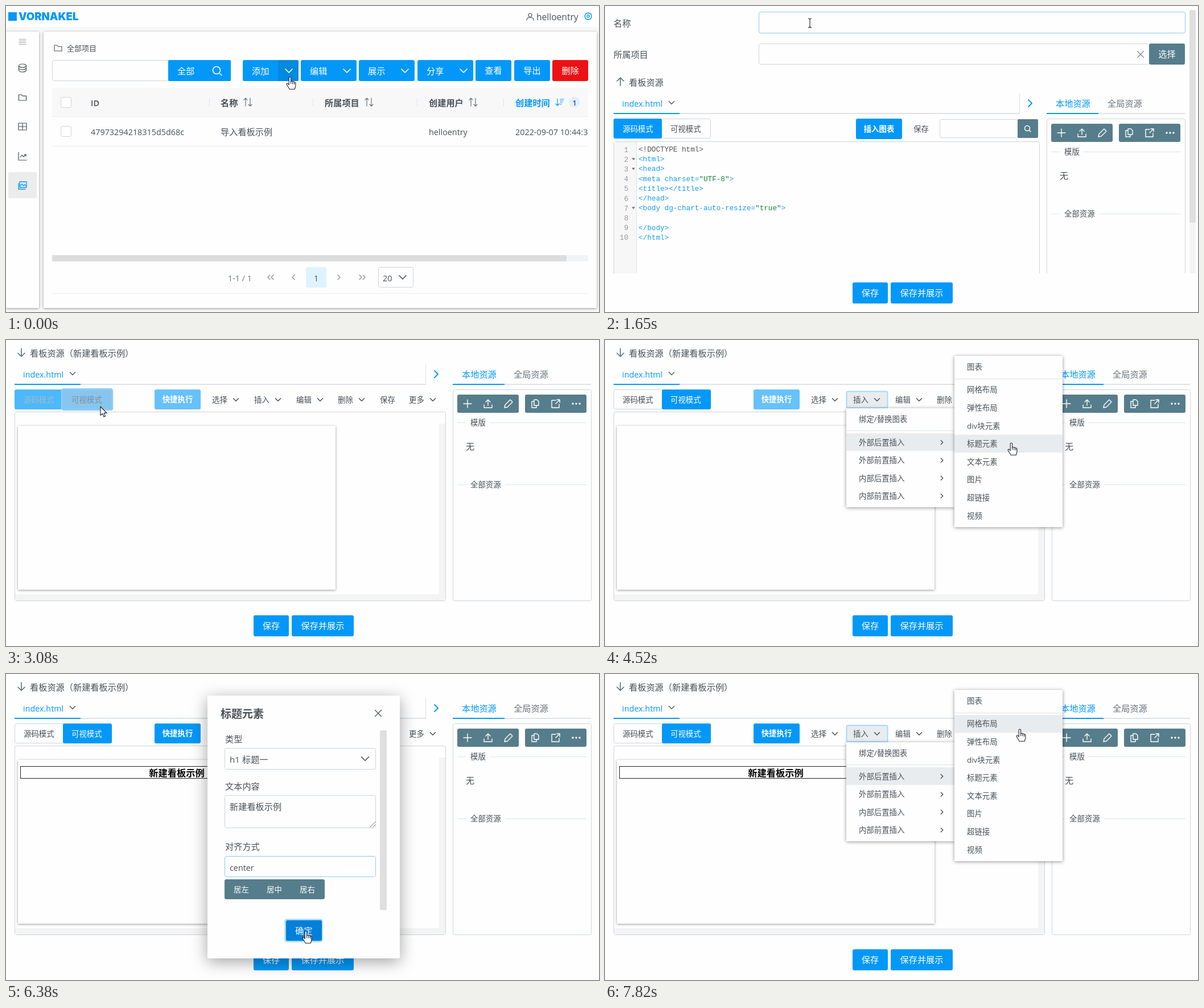
An HTML page for the animation above (8000 ms loop, 1042 px wide and 538 px high).

```html
<!DOCTYPE html>
<html lang="zh-CN">
<head>
<meta charset="utf-8">
<title>看板编辑演示</title>
<style>
html, body { margin: 0; width: 100%; height: 100%; overflow: hidden; background: #fefefe; }
svg { display: block; width: 1042px; height: 538px; }
text { font-family: "Open Sans", "Noto Sans CJK SC", "Noto Sans CJK", sans-serif; white-space: pre; }
.code { font-family: "Liberation Mono", monospace; }
.logo { font-family: Inter, sans-serif; }
.lift { filter: drop-shadow(0 1px 3px rgba(0,0,0,.42)); }
.page { filter: drop-shadow(0 1px 2px rgba(0,0,0,.4)); }
.dialog { filter: drop-shadow(0 6px 14px rgba(0,0,0,.36)); }
</style>
</head>
<body>
<svg id="stage" viewBox="0 0 1042 538"></svg>
<script>
const BLUE = '#0398f7', SLATE = '#567d8b', INK = '#495057', EDGE = '#ced4da', RULE = '#dee2e6',
      HOVER = '#e9ecef', RING = '#a6d9fc', WHITE = '#fefefe';

// Drawing helpers
const rect = (x, y, w, h, fill, r = 0) =>
  `<rect x="${x}" y="${y}" width="${w}" height="${h}" rx="${r}" fill="${fill}"/>`;
const box = (x, y, w, h, stroke = EDGE, fill = WHITE, r = 3) =>
  `<rect x="${x + .5}" y="${y + .5}" width="${w - 1}" height="${h - 1}" rx="${r}" fill="${fill}" stroke="${stroke}"/>`;
const hline = (x1, x2, y, c = RULE, h = 1) => rect(x1, y, x2 - x1, h, c);
const text = (x, cy, s, { size = 15.2, fill = INK, bold = 400, anchor = 'start', cls = '' } = {}) => {
  const latin = /^[\x00-\x7f]*$/.test(s) && !cls;
  return `<text x="${x}" y="${cy + size * .37}" font-size="${latin ? size * .945 : size}" fill="${fill}"
    font-weight="${bold}" text-anchor="${anchor}" class="${cls}">${s.replace(/</g, '&lt;')}</text>`;
};
const small = (x, y, s, fill = INK, bold = 400) => text(x, y, s, { size: 13.4, fill, bold });
const icon = (x, y, d, c = INK, w = 1.3) =>
  `<path transform="translate(${x} ${y})" d="${d}" fill="none" stroke="${c}" stroke-width="${w}" stroke-linecap="round" stroke-linejoin="round"/>`;
const down = (x, y, c = INK, s = 4.5, w = 1.7) => icon(x, y, `M${-s} ${-s / 2}L0 ${s / 2}L${s} ${-s / 2}`, c, w);
const right = (x, y, c = INK, s = 4, w = 1.4) => icon(x, y, `M${-s / 2} ${-s}L${s / 2} 0L${-s / 2} ${s}`, c, w);
const left = (x, y, c) => icon(x, y, 'M2-4L-2 0L2 4', c, 1.4);
const button = (x, y, w, h, s, fill = BLUE, size = 15.2, bold = 400) =>
  rect(x, y, w, h, fill, 3) + text(x + w / 2, y + h / 2, s, { size, bold, fill: '#fff', anchor: 'middle' });

const P = {
  search: 'M5.5 5.5L9 9M6.5 0A6.5 6.5 0 1 1-6.5 0A6.5 6.5 0 0 1 6.5 0',
  folder: 'M-6.5 5V-5H-2L0-2.8H6.5V5Z',
  cross: 'M-5.5-5.5L5.5 5.5M5.5-5.5L-5.5 5.5',
  plus: 'M-7 0H7M0-7V7',
  upload: 'M-7 2V7H7V2M0 3V-7M-4-3L0-7L4-3',
  pen: 'M-7 7L-6 2L3-7L7-3L-2 6Z',
  copy: 'M-2-7H3L6-4V3H-2ZM-2-4H-6V7H2V3',
  open: 'M0-6H-7V7H6V1M2-7H7V-2M7-7L0 0',
  user: 'M3-3A3 3 0 1 1-3-3A3 3 0 0 1 3-3M-6 6Q-6 1.5-2 1.5H2Q6 1.5 6 6',
  bars: 'M-6-4.5H6M-6-1.5H6M-6 1.5H6M-6 4.5H6',
  db: 'M-6.5-4A6.5 3 0 1 1 6.5-4A6.5 3 0 1 1-6.5-4V4A6.5 3 0 0 0 6.5 4V-4M-6.5 0A6.5 3 0 0 0 6.5 0',
  grid: 'M-7-6H7V6H-7ZM-7 0H7M0-6V6',
  chart: 'M-7-7V7H7M-4 2L-1-2L2 1L6-3M3-3H6V0',
  images: 'M-5-6H7V4H-5ZM-7-3V7H5M-5 2L-1-2L2 1L4-1L7 2',
  sort: 'M-4 7V-7M-7-4L-4-7L-1-4M4-7V7M1 4L4 7L7 4',
  sortDown: 'M-4-6V6M-7 3L-4 6L-1 3M1-5H7M1-2H6M1 1H4M1 4H3'
};

function addMenu(hover) {
  const rows = ['新建', '复制', '导入', '导入模板'];
  return `<g class="lift">${rect(412, 134, 196, 163, '#fff', 2)}</g>` +
    (hover ? rect(412, 138, 196, 39, HOVER) : '') +
    rows.map((s, i) => text(432, 157 + 39 * i, s)).join('');
}

function list(on) {
  const dropdowns = [[416, '添加'], [518, '编辑'], [620, '展示'], [723, '分享']];
  const plain = [[825, '查看'], [893, '导出'], [960, '删除']];
  const columns = [[377, '名称', 425], [560, '所属项目', 638], [743, '创建用户', 821]];
  const panel = (x, w) => `<g class="page">${rect(x, 45, w, 486, WHITE, 2)}</g>`;
  const side = [['bars', 63, '#a0a4a8'], ['db', 109], ['folder', 161], ['grid', 212], ['chart', 264]];
  return rect(0, 0, 1042, 538, '#f8f8f8') + rect(0, 0, 1042, 37, WHITE) +
    rect(4, 11, 15, 15, BLUE) +
    text(22, 18.5, 'VORNAKEL', { size: 18.5, fill: BLUE, bold: 900, cls: 'logo' }) +
    icon(921, 19, P.user, INK, 1.1) + text(932, 19, 'helloentry', { size: 16.5 }) +
    icon(1023, 18, 'M6 0L4.5 4.5L0 6L-4.5 4.5L-6 0L-4.5-4.5L0-6L4.5-4.5ZM2 0A2 2 0 1 1-2 0A2 2 0 0 1 2 0', BLUE, 1.4) +
    panel(0, 58) + panel(66, 972) + rect(4, 292, 50, 46, '#ececec', 3) +
    side.map(([k, y, c]) => icon(29, y, P[k], c, 1.2)).join('') + icon(29, 315, P.images, BLUE) +
    icon(91.5, 74, P.folder, INK, 1.1) + text(107, 74, '全部项目', { size: 13 }) +
    box(81, 95, 205, 37) + rect(285, 95, 110, 37, BLUE, 2) + text(301, 114, '全部', { fill: '#fff' }) +
    icon(370, 113, P.search, '#fff', 1.5) +
    dropdowns.map(([x, s], i) => rect(x, 95, 98, 37, BLUE, 3) +
      (i ? '' : rect(478, 95, 36, 37, '#0489e0', 3)) +
      text(x + 16, 114, s, { fill: '#fff' }) + down(x + 81, 114, '#fff', 6)).join('') +
    plain.map(([x, s], i) => button(x, 95, 63, 37, s, i > 1 ? '#ec1114' : BLUE)).join('') +
    rect(81, 144, 942, 50, '#f8f8f9') + hline(81, 1023, 194, HOVER) + hline(81, 1023, 246, HOVER) +
    box(96, 160, 19, 19) + box(96, 211, 19, 19) +
    [357, 539, 722, 874].map(x => rect(x, 163, 1, 14, RULE)).join('') +
    text(149, 170, 'ID', { bold: 600 }) +
    columns.map(([x, s, ix]) => text(x, 170, s, { bold: 600 }) + icon(ix, 169, P.sort, '#6c757d', 1.2)).join('') +
    text(895, 170, '创建时间', { bold: 600, fill: BLUE }) + icon(973, 169, P.sortDown, BLUE, 1.2) +
    `<circle cx="999" cy="169" r="9.5" fill="#dff1fd"/>` +
    text(999, 169.5, '1', { size: 14, bold: 600, anchor: 'middle' }) +
    text(149, 221, '47973294218315d5d68c') + text(377, 221, '导入看板示例') +
    text(743, 221, 'helloentry') + text(895, 221, '2022-09-07 10:44:32') + rect(1023, 196, 14, 49, WHITE) +
    rect(81, 438, 942, 11, '#f1f3f5') + rect(81, 438, 904, 11, '#dcdcdc', 2) +
    text(390, 478, '1-1 / 1', { fill: '#6c757d' }) +
    left(462, 477, '#8b9299') + left(468, 477, '#8b9299') + left(505, 477, '#8b9299') +
    rect(527, 459, 36, 36, '#dff3fd', 3) + text(545, 478, '1', { anchor: 'middle' }) +
    right(585, 477, '#8b9299') + right(623, 477, '#8b9299') + right(629, 477, '#8b9299') +
    box(654, 459, 62, 36) + text(662, 478, '20') + down(697, 477, INK, 6) +
    hline(81, 1023, 505, HOVER) + (on.add ? addMenu(on.hover) : '');
}

function source(x, y, bottom) {
  const lines = ['<!DOCTYPE html>', '<html>', '<head>', '<meta charset="UTF-8">', '<title></title>', '</head>',
    '<body dg-chart-auto-resize="true">', '', '</body>', '</html>'];
  const paint = (s, i) => i ? s.split(/("[^"]*")/).map((p, k) =>
    `<tspan fill="${k % 2 ? '#16873f' : '#1a9de9'}">${p.replace(/</g, '&lt;')}</tspan>`).join('') : s.replace(/</g, '&lt;');
  return button(x + 441, y + 198, 81, 36, '插入图表', BLUE, 13.4, 600) + small(x + 542, y + 216, '保存') +
    box(x + 588, y + 199, 138, 33) + rect(x + 725, y + 199, 36, 33, SLATE, 2) +
    icon(x + 742, y + 215, 'M3.5 3.5L6 6M4.5 0A4.5 4.5 0 1 1-4.5 0A4.5 4.5 0 0 1 4.5 0', '#fff', 1.5) +
    box(15, y + 238, 749 + x, bottom - y - 238) + rect(16, y + 239, 39, bottom - y - 240, '#f7f7f7') +
    rect(55, y + 239, 1, bottom - y - 240, RULE) +
    lines.map((s, i) => {
      const cy = y + 252 + 17.2 * i;
      return text(41, cy, String(i + 1), { size: 12.67, fill: '#999', anchor: 'end', cls: 'code' }) +
        `<text class="code" x="59" y="${cy + 4}" font-size="12.67" fill="#555">${paint(s, i)}</text>` +
        ([1, 2, 6].includes(i) ? `<path d="M47 ${cy - 2}h6l-3 4z" fill="#777"/>` : '');
    }).join('');
}

function visual(on) {
  const tools = [[362, '选择'], [436, '插入'], [510, '编辑'], [583, '删除'], [708, '更多']];
  return button(261, 87, 81, 35, '快捷执行', on.quick ? BLUE : '#67c1fa', 13.4, 600) +
    (on.insert ? `<rect x="424.5" y="90.5" width="72" height="29" rx="2" fill="${HOVER}" stroke="${RING}" stroke-width="2"/>` : '') +
    tools.map(([x, s]) => small(x, 105, s) + down(x + 42, 105, INK, 4.5, 1.5)).join('') + small(657, 105, '保存') +
    box(15, 126, 758, 333) + rect(761, 147, 11, 311, '#f4f4f4') + rect(16, 447, 756, 11, '#f4f4f4') +
    `<g class="page">${rect(21, 151, 558, 288, WHITE)}</g>` +
    (on.title ? box(25, 162, 550, 22, '#222', WHITE, 0) +
      text(300, 173.5, '新建看板示例', { size: 16.3, bold: 700, fill: '#000', anchor: 'middle' }) : '');
}

function modes(y, on) {
  if (on.fading) return rect(15, y, 84, 35, '#4cb9fb', 3) + small(31, y + 18, '源码模式', '#a3bac9') +
    `<rect x="98" y="${y - 1}" width="89" height="37" rx="3" fill="#88c5ee" stroke="#8dd0fc" stroke-width="2.5"/>` +
    small(115, y + 18, '可视模式', '#7f8f9b');
  const v = on.visual;
  return box(15, y, 171, 35) + rect(v ? 100 : 15, y, v ? 86 : 85, 35, BLUE, 3) +
    (on.ring ? `<rect x="99" y="${y - 1}" width="88" height="37" rx="4" fill="none" stroke="${RING}" stroke-width="2"/>` : '') +
    small(31, y + 18, '源码模式', v ? INK : '#fff') + small(115, y + 18, '可视模式', v ? '#fff' : INK);
}

function resources(x, y, bottom) {
  const slate = (bx, w, keys) => rect(bx, y + 207, w, 32, SLATE, 3) +
    keys.map((k, i) => icon(bx + 18 + 36 * i, y + 223, P[k], '#fff', 1.4)).join('');
  const legend = (cy, s, end) => hline(x + 784, x + 799, cy) + hline(x + end, x + 1011, cy) + small(x + 807, cy + .5, s);
  return text(x + 792, y + 171, '本地资源', { fill: BLUE }) + text(x + 883, y + 171, '全局资源', { fill: '#6c757d' }) +
    hline(x + 776, x + 867, y + 188, BLUE, 2) + hline(x + 867, x + 1019, y + 188, RULE, 2) +
    box(x + 776, y + 198, 244, bottom - y - 198) + slate(x + 784, 108, ['plus', 'upload', 'pen']) +
    slate(x + 903, 108, ['copy', 'open']) +
    [-6, 0, 6].map(d => `<circle cx="${x + 993 + d}" cy="${y + 223}" r="1.7" fill="#fff"/>`).join('') +
    legend(y + 256, '模版', 841) + text(x + 799, y + 298, '无') + legend(y + 365, '全部资源', 868);
}

function editor(on) {
  const wide = on.wide, x = wide ? 9 : 0, y = wide ? -111 : 0, bottom = wide ? 459 : 490;
  let out = rect(0, 0, 1042, 538, WHITE);
  if (!wide) out += text(15, 30, '名称') + box(270, 10, 750, 38, on.focus ? '#8cc9f5' : EDGE) +
    (on.name ? text(278, 30, '新建看板示例') : '') +
    text(15, 85, '所属项目') + box(270, 66, 688, 37) + icon(941, 85, P.cross, '#7b838a', 1.1) +
    button(956, 66, 63, 37, '选择', SLATE);
  out += icon(27, wide ? 22 : 133, wide ? 'M0-7V7M-6 1L0 7L6 1' : 'M0 7V-7M-6-1L0-7L6-1', '#56707c', 1.6) +
    text(42, y + 134, wide ? '看板资源（新建看板示例）' : '看板资源') +
    text(30, y + 171, 'index.html', { fill: BLUE }) + down(117, y + 170, '#666', 4.5) +
    hline(15, 131, y + 188, BLUE, 2) + hline(131, x + 728, y + 188, RULE, 2) +
    rect(x + 728, y + 153, 1, 37, RULE) + right(x + 747, y + 171, BLUE, 6, 1.9) +
    modes(y + 198, on) + (on.visual || on.fading ? visual(on) : source(x, y, bottom)) + resources(x, y, bottom);
  if (!wide) out += rect(0, 470, 1042, 68, WHITE) + rect(1027, 7, 11, 463, '#f4f4f4') + rect(1027, 7, 11, 374, '#dfdfdf', 2);
  const by = wide ? 484 : 486;
  return out + button(435, by, 62, 37, '保存') + button(502, by, 109, 37, '保存并展示') +
    (on.menu ? insertMenu(on) : '') + (on.dialog ? dialog(on) : '');
}

function insertMenu(on) {
  const rows = ['外部后置插入', '外部前置插入', '内部后置插入', '内部前置插入'];
  const kinds = ['网格布局', '弹性布局', 'div块元素', '标题元素', '文本元素', '图片', '超链接', '视频'];
  let out = `<g class="lift">${rect(424, 120, 190, 174, WHITE)}</g>` + small(446, 139, '绑定/替换图表') +
    hline(424, 613, 159) + (on.sub || on.first ? rect(424, 164, 190, 31, HOVER) : '') +
    rows.map((s, i) => small(446, 180 + 31.4 * i, s) + right(592, 180 + 31.4 * i, INK, 3.5)).join('');
  if (on.sub) out += `<g class="lift">${rect(614, 28, 190, 301, WHITE)}</g>` +
    (on.pick >= 0 ? rect(614, 72 + 31.5 * on.pick, 190, 31.5, HOVER) : '') +
    small(636, 47.5, '图表') + hline(614, 804, 68) +
    kinds.map((s, i) => small(636, 87.5 + 31.6 * i, s)).join('');
  return out;
}

function dialog(on) {
  return `<g class="dialog">${rect(354, 38, 338, 462, WHITE, 2)}</g>` +
    text(377, 70, '标题元素', { size: 19, bold: 600 }) + icon(654, 69, P.cross, '#5c646b', 1.5) +
    text(385, 114, '类型') + box(384, 130, 266, 38) + text(393, 150, 'h1 标题一') + down(631, 149, INK, 6.5, 1.6) +
    text(385, 197, '文本内容') + box(384, 213, 266, 58, on.area ? '#8cc9f5' : EDGE) +
    icon(645, 265, 'M-5 4L4-5M0 4L4 0', '#777', 1) + (on.words ? text(393, 233, '新建看板示例') : '') +
    text(385, 303, '对齐方式') + box(384, 320, 266, 37, on.align ? '#8cc9f5' : EDGE) +
    (on.align ? text(393, 340, 'center') : '') +
    rect(384, 361, 176, 35, SLATE, 3) + ['居左', '居中', '居右'].map((s, i) => small(400 + 58 * i, 379, s, '#fff')).join('') +
    rect(657, 99, 12, 316, '#dfdfdf', 2) +
    (on.press ? rect(489.5, 430.5, 67, 41, RING, 4) : '') +
    button(492, 433, 63, 36, '确定', on.press ? '#0280da' : BLUE);
}

const CURSORS = {
  arrow: 'M0 0V15.5L3.6 12.3L6 18L8.5 17L6.2 11.4H11Z',
  hand: 'M-1.8 1.5c0-2 3.4-2 3.4 0v6.3c1-1 3-.6 3.2.6 1-.8 2.6-.3 2.8.8 1-.5 2.3.1 2.3 1.5v4.6c0 3-1.4 3.6-1.6 6H-1c-.6-2.4-2-3.6-3.4-5.8-1.4-2.2-2.2-3.4-1.1-4.2 1.1-.8 2.2.2 3.7 2zM1.6 8v4M4.8 9v3.5M7.6 10v3',
  beam: 'M-3-8Q0-8 0-6Q0-8 3-8M0-6V6M-3 8Q0 8 0 6Q0 8 3 8'
};
const cursor = (k, x, y) =>
  `<path transform="translate(${x} ${y})" d="${CURSORS[k]}" fill="${k === 'beam' ? 'none' : '#fff'}" stroke="#1d1d2b" stroke-width="1.1" stroke-linejoin="round"/>`;

// Each step: start time, scene, cursor, x, y, flags
const V = 'wide visual ', Q = V + 'quick ', D = Q + 'dialog ', T = Q + 'title ';
const steps = [
  [0, list, 'hand', 499, 125, ''],
  [210, list, 'hand', 499, 125, 'add'],
  [420, list, 'hand', 492, 142, 'add hover'],
  [620, list, 'hand', 486, 152, 'add hover'],
  [820, null, 'arrow', 484, 152, ''],
  [1240, editor, 'arrow', 484, 152, ''],
  [1450, editor, 'arrow', 420, 75, ''],
  [1650, editor, 'beam', 360, 30, 'focus'],
  [1850, editor, 'beam', 360, 30, 'focus name'],
  [2050, editor, 'arrow', 190, 86, 'focus name'],
  [2250, editor, 'hand', 24, 128, 'focus name'],
  [2460, editor, 'hand', 24, 128, 'name click'],
  [2680, editor, 'arrow', 24, 128, 'wide'],
  [2880, editor, 'hand', 150, 112, 'wide'],
  [3080, editor, 'arrow', 166, 117, 'wide fading'],
  [3280, editor, 'arrow', 166, 117, V + 'ring'],
  [3490, editor, 'arrow', 230, 118, V + 'ring'],
  [3710, editor, 'hand', 452, 105, V + 'insert'],
  [3910, editor, 'hand', 468, 130, V + 'insert menu'],
  [4110, editor, 'hand', 520, 176, V + 'insert menu sub'],
  [4320, editor, 'hand', 640, 180, V + 'insert menu sub pick3'],
  [4520, editor, 'hand', 714, 181, V + 'insert menu sub pick3'],
  [4930, editor, 'arrow', 713, 181, D],
  [5140, editor, 'beam', 520, 238, D + 'area'],
  [5340, editor, 'beam', 520, 238, D + 'area words'],
  [5550, editor, 'hand', 474, 374, D + 'words'],
  [5750, editor, 'hand', 474, 374, D + 'words align'],
  [5960, editor, 'hand', 515, 430, D + 'words align'],
  [6170, editor, 'hand', 527, 452, D + 'words align press'],
  [6380, editor, 'hand', 527, 452, D + 'words align press title'],
  [6590, editor, 'arrow', 527, 452, T],
  [6790, editor, 'arrow', 515, 340, T],
  [7000, editor, 'arrow', 482, 190, T],
  [7200, editor, 'hand', 464, 105, T + 'insert'],
  [7400, editor, 'hand', 470, 130, T + 'insert menu'],
  [7610, editor, 'hand', 560, 176, T + 'insert menu sub'],
  [7820, editor, 'hand', 729, 97, T + 'insert menu sub pick0']
];

const stage = document.getElementById('stage');
const begin = performance.now();
let shown;

function draw([, scene, kind, x, y, flags]) {
  const on = { pick: -1 };
  for (const f of flags.split(' ')) {
    if (f.startsWith('pick')) on.pick = +f[4]; else on[f] = true;
  }
  stage.innerHTML = (scene ? scene(on) : rect(0, 0, 1042, 538, WHITE)) +
    (on.click ? '<circle cx="22" cy="128" r="11" fill="#f6e83e" opacity=".75"/>' : '') + cursor(kind, x, y);
}

function tick() {
  const t = (performance.now() - begin) % 8000;
  const step = steps.findLast(s => s[0] <= t) || steps[0];
  if (step !== shown) draw(shown = step);
  requestAnimationFrame(tick);
}
tick();
</script>
</body>
</html>
```
